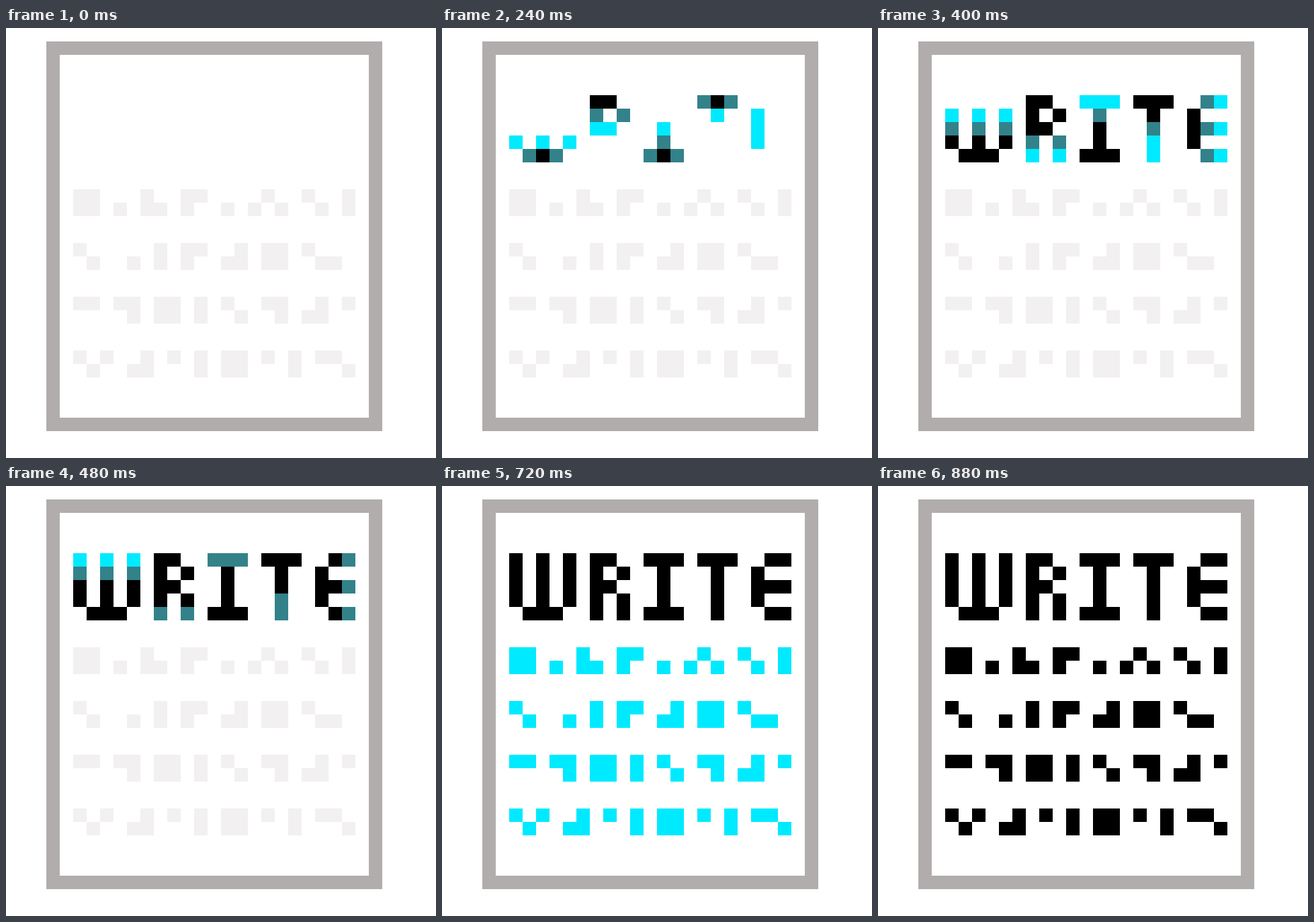
These frames come from a looping animation (640x640 px, 1120 ms). An HTML page with a canvas:

```html
<!DOCTYPE html>
<html lang="en">
<head>
<meta charset="utf-8">
<title>Write</title>
<style>
  html, body { margin: 0; height: 100%; overflow: hidden; background: #fff; }
  canvas { display: block; }
</style>
</head>
<body>
<canvas id="stage" width="640" height="640"></canvas>
<script>
const ctx = document.getElementById("stage").getContext("2d");
const LOOP = 1120, STEP = 80, CELL = 20, LEFT = 100;
const INK = ["#00eaff", "#33828a", "#000"];
const PALE = "#f2f0f1", FRAME = "#b1adac";

// Each digit is the step at which that cell of the word is first inked.
const word = [
  "6.6.6.11..555.212..45",
  "5.5.5.2.2..4...3..3..",
  "4.4.4.33...3...4..e45",
  "3.3.3.4.4..i...5..3..",
  ".212..5.5.212..5...45"
];
// Cells with their own [cyan, teal] steps.
const special = { e: [2, 4], i: [3, 3] };

const lines = [
  ["##...#..##....#..#..#", "##.#.##.#..#.#.#..#.#"],
  ["#.....#.##..#.##.#...", ".#..#.#.#..##.##..##."],
  ["##.##.##.#.#..##..#.#", "....#.##.#..#..#.##.."],
  ["#.#..#.#.#.##.#.#.##.", ".#..##...#.##...#...#"]
];

function paint(rows, top, colorOf) {
  rows.forEach((row, y) => [...row].forEach((ch, x) => {
    const color = ch !== "." && colorOf(ch);
    if (!color) return;
    ctx.fillStyle = color;
    ctx.fillRect(LEFT + x * CELL, top + y * CELL, CELL, CELL);
  }));
}

function wordColor(ch, step) {
  const [cyan, teal] = special[ch] || [+ch, +ch + 1];
  if (step >= 7 || step > teal) return INK[2];
  if (step >= teal) return INK[1];
  return step >= cyan ? INK[0] : null;
}

function draw(now) {
  const step = Math.floor(now % LOOP / STEP);
  ctx.fillStyle = "#fff";
  ctx.fillRect(0, 0, 640, 640);
  ctx.fillStyle = FRAME;
  ctx.fillRect(60, 20, 500, 580);
  ctx.fillStyle = "#fff";
  ctx.fillRect(80, 40, 460, 540);

  paint(word, 100, ch => wordColor(ch, step));
  const lineColor = step < 9 ? PALE : INK[Math.min(step - 9, 2)];
  lines.forEach((rows, i) => paint(rows, 240 + i * 80, () => lineColor));
}

const start = performance.now();
function tick() {
  draw(performance.now() - start);
  requestAnimationFrame(tick);
}
tick();
</script>
</body>
</html>
```
